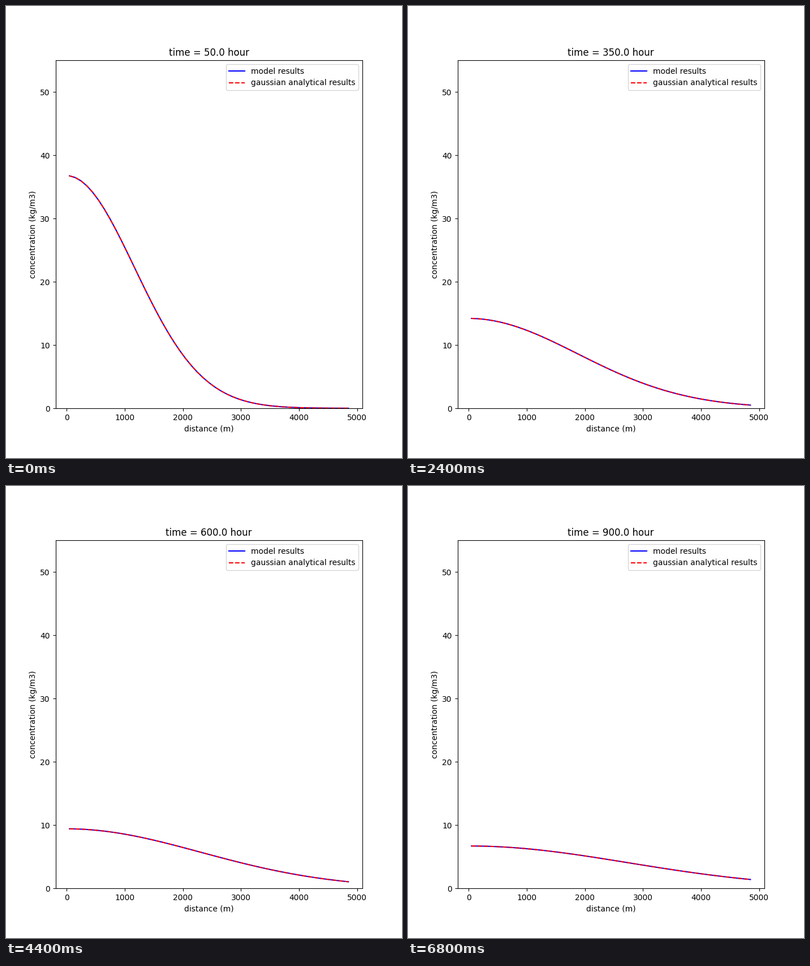
A matplotlib script that plays this animation: 700x800 px, repeating every 7.2 s.

```python
import numpy as np
import matplotlib.pyplot as plt
from matplotlib.animation import FuncAnimation

PEAK = 50.0        # initial concentration at the centre, kg/m3
SIGMA0 = 1000.0    # initial spread, m
DIFFUSION = 1.0    # m2/s
STEP_HOURS = 50.0
FRAMES = 18

x = np.arange(50.0, 4851.0, 100.0)


def concentration(hours):
    """Two-dimensional Gaussian patch spreading by diffusion."""
    var = SIGMA0**2 + 2 * DIFFUSION * hours * 3600
    return PEAK * SIGMA0**2 / var * np.exp(-x**2 / (2 * var))


fig, ax = plt.subplots(figsize=(7, 8), dpi=100)
start = concentration(STEP_HOURS)
model, = ax.plot(x, start, "b-", label="model results")
exact, = ax.plot(x, start, "r--", label="gaussian analytical results")
ax.set_ylim(0, 55)
ax.set_xlabel("distance (m)")
ax.set_ylabel("concentration (kg/m3)")
ax.legend(loc="upper right")
title = ax.set_title("")


def update(i):
    hours = STEP_HOURS * (i + 1)
    c = concentration(hours)
    model.set_ydata(c)
    exact.set_ydata(c)
    title.set_text(f"time = {hours:.1f} hour")
    return model, exact, title


anim = FuncAnimation(fig, update, frames=FRAMES, interval=400, repeat=True,
                     repeat_delay=0, blit=False)
plt.show()
```
